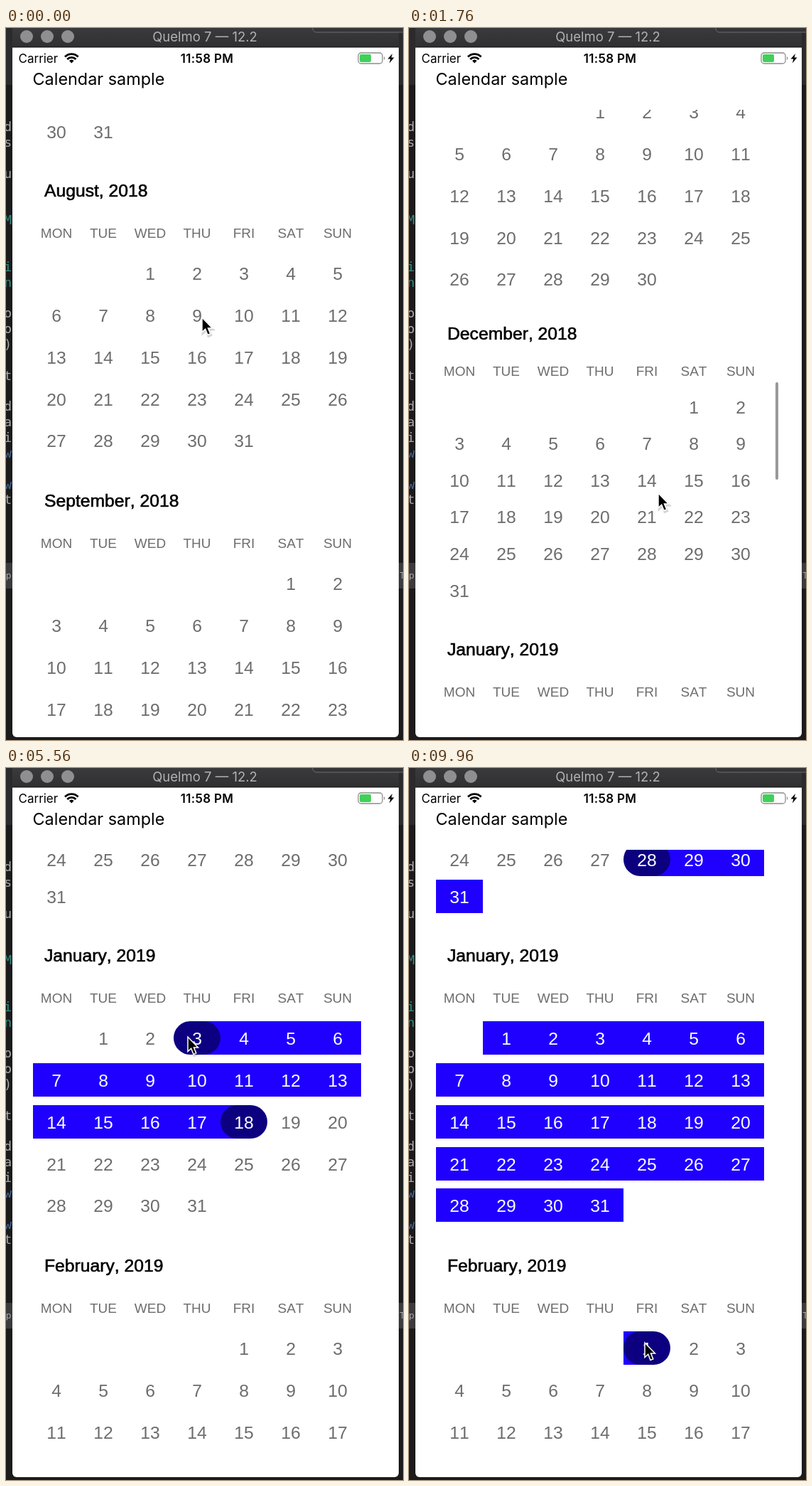
Write an HTML page that moves like this. It is 559 by 1001 pixels and loops after 10000 ms.

```html
<!DOCTYPE html>
<html lang="en">
<head>
<meta charset="utf-8">
<title>Calendar sample</title>
<style>
  html, body { margin: 0; width: 100%; height: 100%; overflow: hidden; background: #1b1b1c; }
  svg { display: block; width: 559px; height: 1001px; }
  .ui { font-family: Inter, Roboto, sans-serif; }
  .code { font: 18px "DejaVu Sans Mono", "Noto Sans Mono", monospace; text-anchor: end; }
  #months { font: 24.7px "Liberation Sans", Arial, sans-serif; font-kerning: none; }
  #months text { fill: #6d6d6d; text-anchor: middle; }
  #months .title { fill: #000; stroke: #000; stroke-width: .6px; text-anchor: start; }
  #months .week { font-size: 19px; }
  .fill { fill: #1f00ff; shape-rendering: crispEdges; }
  .pill { fill: #0d0080; }
  .fill, .pill { display: none; }
  .on .fill, .first .pill, .last .pill { display: inline; }
  #months .on text { fill: #fff; }
</style>
</head>
<body>
<svg viewBox="0 0 559 1001">
  <defs>
    <clipPath id="view"><rect x="10" y="115" width="543" height="855"/></clipPath>
    <linearGradient id="bar" x2="0" y2="1">
      <stop stop-color="#3a3a3c"/><stop offset="1" stop-color="#303032"/>
    </linearGradient>
    <path id="arrow" d="M0 0V20.5L4.7 16.2L8 24.5L11.8 22.9L8.5 14.9H14.5Z"/>
  </defs>

  <rect width="559" height="1001" fill="#1b1b1c"/>
  <rect width="559" height="80" fill="#2b2b2d"/>
  <rect y="752" width="559" height="36" fill="#3b3b3d"/>
  <g id="code" class="code"></g>
  <g class="ui" font-size="12" fill="#aaa">
    <text x="0" y="774">p</text><text x="554" y="774">T</text>
  </g>

  <path d="M9 0H553V991a6 6 0 0 1-6 6H15a6 6 0 0 1-6-6Z" fill="#fff"/>
  <rect x="9" width="544" height="27" fill="url(#bar)"/>
  <rect x="9" y="26" width="544" height="1.5" fill="#1a1a1a"/>
  <path d="M432 -1V1a5 5 0 0 0 5 5H560V-1Z" fill="#353537" stroke="#6c6c6e"/>
  <g fill="#8f8f91">
    <circle cx="29" cy="12" r="9"/><circle cx="58" cy="12" r="9"/><circle cx="87" cy="12" r="9"/>
  </g>

  <g class="ui">
    <text x="280" y="19" font-size="18.5" fill="#b2b2b4" text-anchor="middle">Quelmo 7 — 12.2</text>
    <text x="17.5" y="49" font-size="17">Carrier</text>
    <text x="283" y="49" font-size="17" font-weight="600" letter-spacing=".3" text-anchor="middle">11:58 PM</text>
    <text x="37.5" y="80" font-size="23.4">Calendar sample</text>
  </g>
  <path d="M83 40.5a13.2 13.2 0 0 1 18.6 0M86.2 43.9a8.6 8.6 0 0 1 12.2 0" fill="none" stroke="#000" stroke-width="2.8"/>
  <path d="M92.3 49.4l-3.3-3.4a4.8 4.8 0 0 1 6.6 0Z"/>
  <rect x="496" y="35" width="34" height="15" rx="4" fill="none" stroke="#8c8c8c" stroke-width="1.3"/>
  <path d="M532 40a3 3 0 0 1 0 5Z" fill="#8c8c8c"/>
  <rect x="498" y="37" width="16" height="11" rx="2" fill="#40d058"/>
  <path d="M544 36L537.5 43.5H541.3L539.8 49.5L546.5 41.5H542.6Z"/>

  <g clip-path="url(#view)"><g id="months"></g></g>
  <rect id="thumb" x="516" width="4" height="137" rx="2" fill="#999"/>
  <g id="cursor">
    <use href="#arrow" x="1" y="2" stroke="#000" stroke-width="3" opacity=".16"/>
    <use href="#arrow" stroke="#fff" stroke-width="1.5"/>
  </g>
</svg>
<script>
const LOOP = 10000, SLOT = 436, COL = 66, ROW_H = 47;
const $ = id => document.getElementById(id);
const clamp = v => Math.max(0, Math.min(1, v));
const smooth = u => u * u * (3 - 2 * u);

function add(parent, tag, attrs, text) {
  const el = document.createElementNS('http://www.w3.org/2000/svg', tag);
  for (const k in attrs) el.setAttribute(k, attrs[k]);
  if (text !== undefined) el.textContent = text;
  parent.appendChild(el);
  return el;
}

// Line ends of the editor behind the window, one character per line
[...'ds u  M  in oo) t daiw wt'].forEach((ch, i) => {
  const fill = ch === 'w' ? '#456a9c' : i > 5 && i < 11 ? '#2f8f80' : '#a9a9ab';
  add($('code'), 'text', { x: 8, y: 145 + i * 21.85, fill }, ch);
});

// Calendar, July 2018 onwards; six-week months are packed tighter
const cells = [];
const colX = c => 71 + c * COL;

function buildMonth(m) {
  const date = new Date(2018, 6 + m, 1);
  const lead = (date.getDay() + 6) % 7;
  const days = new Date(2018, 7 + m, 0).getDate();
  const tight = lead + days > 35;
  const [titleY, weekY, firstY, pitch] = tight ? [-8, 45, 95, 51.6] : [0, 60, 116.6, 58.8];
  const g = add($('months'), 'g', { transform: `translate(0 ${228 + (m - 1) * SLOT})` });
  const name = date.toLocaleString('en-US', { month: 'long' });
  add(g, 'text', { class: 'title', x: 54, y: titleY + 9 }, `${name}, ${date.getFullYear()}`);
  'MON TUE WED THU FRI SAT SUN'.split(' ').forEach((d, c) =>
    add(g, 'text', { class: 'week', x: colX(c), y: weekY + 7 }, d));
  for (let d = 1; d <= days; d++) {
    const i = lead + d - 1;
    const top = Math.round(firstY + Math.floor(i / 7) * pitch - ROW_H / 2);
    const el = add(g, 'g', { transform: `translate(${colX(i % 7)} ${top})` });
    const fill = add(el, 'rect', { class: 'fill', height: ROW_H });
    add(el, 'rect', { class: 'pill', x: -COL / 2, width: COL, height: ROW_H, rx: ROW_H / 2 });
    add(el, 'text', { y: 33 }, d);
    cells.push({ el, fill, key: m * 100 + d });
  }
}
for (let m = 0; m < 9; m++) buildMonth(m);

// Taps as [time, month * 100 + day]; every second tap closes a range
const taps = [[3920, 618], [5040, 603], [6560, 624], [7160, 625], [8680, 528], [9920, 701]];
let shown = -1;

function select(count) {
  if (count === shown) return;
  shown = count;
  const open = taps.slice(count - (count % 2 || 2), count).map(tap => tap[1]);
  const a = Math.min(...open), b = Math.max(...open);
  for (const { el, fill, key } of cells) {
    const on = key >= a && key <= b, first = key === a, last = key === b;
    el.setAttribute('class', [on && 'on', first && 'first', last && 'last'].filter(Boolean).join(' '));
    const left = first ? 0 : -COL / 2, right = last ? 0 : COL / 2;
    fill.setAttribute('x', left);
    fill.setAttribute('width', right - left);
  }
}

// Pointer moves: [begin, end, x, y]; it rests in between
const moves = [
  [40, 360, 340, 634], [640, 820, 431, 146], [1300, 1640, 351, 654], [1760, 2080, 397, 244],
  [2720, 3120, 327, 491], [4280, 4800, 256, 378], [5560, 5840, 62, 470], [5840, 6240, 271, 562],
  [6720, 7120, 328, 562], [7560, 8240, 350, 154], [8960, 9760, 332, 808]];

function pointer(t) {
  let x = 276, y = 407;
  for (const [begin, end, toX, toY] of moves) {
    const e = smooth(clamp((t - begin) / (end - begin)));
    x += (toX - x) * e;
    y += (toY - y) * e;
  }
  return [x, y];
}

// Drag, inertial glide until caught, then a second flick
function scroll(t, y) {
  if (t < 640) return 0;
  if (t < 820) return 634 - y;
  if (t < 1760) return Math.min(1532, 488 + 1277 * (1 - Math.exp(-(t - 820) / 500)));
  return 1532 + 613 * (1 - (1 - clamp((t - 1760) / 600)) ** 3);
}

function draw(t) {
  const [x, y] = pointer(t);
  const s = Math.round(scroll(t, y));
  $('cursor').setAttribute('transform', `translate(${x.toFixed(1)} ${y.toFixed(1)})`);
  $('months').setAttribute('transform', `translate(0 ${-s})`);
  $('thumb').setAttribute('y', 249.1 + s * 0.1622);
  $('thumb').setAttribute('opacity', Math.min(clamp((t - 640) / 80), clamp((2600 - t) / 120)));
  select(taps.filter(tap => tap[0] <= t).length);
}

const start = performance.now();
function frame() {
  draw((performance.now() - start) % LOOP);
  requestAnimationFrame(frame);
}
frame();
</script>
</body>
</html>
```
